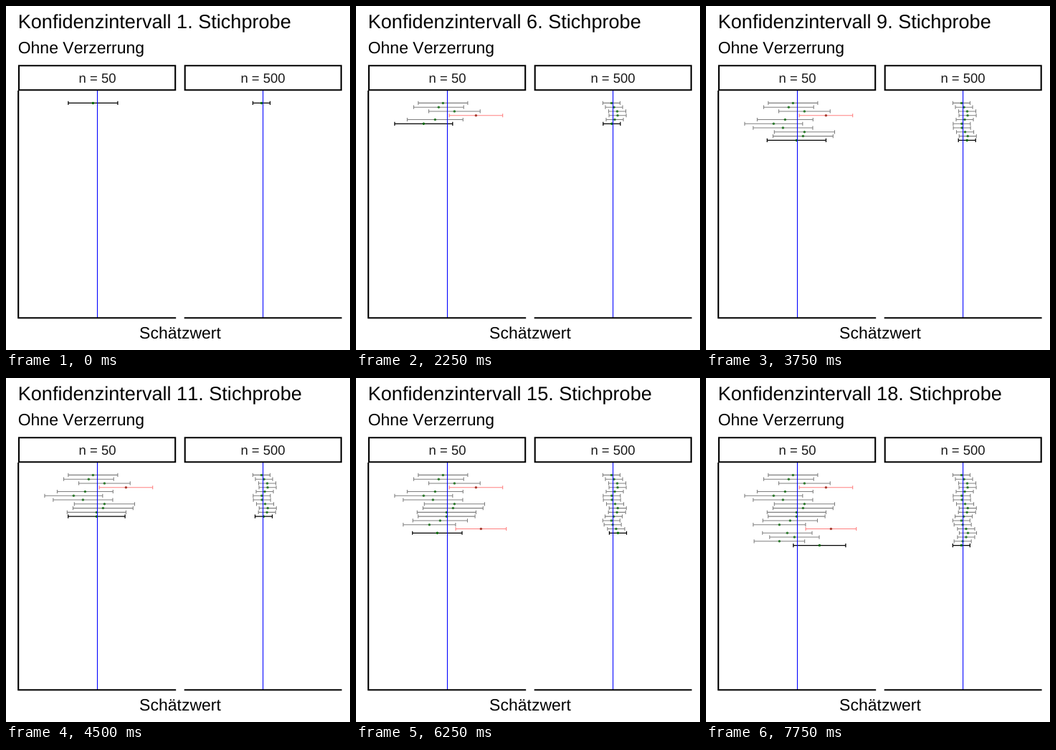
Recreate the animation shown at these times as an HTML page. Size 480 by 480 pixels, loop 8000 ms.

```html
<!DOCTYPE html>
<html lang="de">
<head>
<meta charset="utf-8">
<title>Konfidenzintervall</title>
<style>
  html, body { margin: 0; width: 100%; height: 100%; overflow: hidden; background: #fff; }
  svg { display: block; width: 100vw; height: 100vh; }
  text { font-family: "Liberation Sans", Arial, sans-serif; font-size: 23px; font-kerning: none; text-rendering: geometricPrecision; }
  .title { font-size: 27.1px; }
  .strip { font-size: 18.5px; fill: #1a1a1a; text-anchor: middle; }
  .frame { fill: none; stroke: #000; stroke-width: 2.1; }
  .truth { stroke: #00f; stroke-width: 1.07; }
  .bar { fill: none; stroke: #000; stroke-width: 1.07; opacity: 0.5; }
  .dot { fill: #006400; opacity: 0.75; }
  .missed .bar { stroke: #f00; }
  .missed .dot { fill: #8b1000; }
  .newest .bar { stroke-width: 1.25; opacity: 1; }
  .newest .dot { opacity: 1; }
</style>
</head>
<body>
<svg viewBox="0 0 480 480">
  <text id="title" class="title" x="16.7" y="31"></text>
  <text x="16.7" y="66">Ohne Verzerrung</text>
  <text x="243" y="464" text-anchor="middle">Schätzwert</text>
  <text class="strip" x="127.5" y="107">n = 50</text>
  <text class="strip" x="358.5" y="107">n = 500</text>
  <g id="bars"></g>
  <path class="truth" d="M127.5 118V435M358.6 118V435"/>
  <path class="frame" d="M18 83.2H236.2V117.2H18ZM249.7 83.2H467.7V117.2H249.7ZM17.2 118V435.2M16.2 435.2H237.2M248.7 435.2H468.6"/>
</svg>
<script>
const FRAME_MS = 250, FRAMES = 32, SAMPLES = 18;
const FIRST_Y = 135.4, ROW = 5.775, CAP = 2.6;

const wave = (i, peak, period) => Math.cos(2 * Math.PI * (i - peak) / period);

// Errors of the small samples; the large samples stay close to the truth.
const errors = [-6, -12, 10, 40, -17, -33, -20, 10, 8, -1, -1, -10, -25, 47, -14, -4, -25, 31];
const panels = [
  { truth: 127.4, error: i => errors[i], half: i => 38.3 - 3.8 * wave(i, 0, 14.5) },
  { truth: 358.6, error: i => 2.3 + 4.6 * wave(i, 2.6, 5.7), half: () => 12 }
];

function add(parent, tag, attributes) {
  const node = document.createElementNS("http://www.w3.org/2000/svg", tag);
  for (const key in attributes) node.setAttribute(key, attributes[key]);
  return parent.appendChild(node);
}

function drawInterval(row, i, { truth, error, half }) {
  const y = FIRST_Y + i * ROW, x = truth + error(i);
  const lo = x - half(i), hi = x + half(i);
  const group = add(row, "g", { class: lo > truth || hi < truth ? "missed" : "" });
  const cap = end => `M${end} ${y - CAP}v${2 * CAP}`;
  add(group, "path", { class: "bar", d: `${cap(lo)}M${lo} ${y}H${hi}${cap(hi)}` });
  add(group, "circle", { class: "dot", cx: x, cy: y, r: 1.75 });
}

const title = document.getElementById("title");
const layer = document.getElementById("bars");
const rows = Array.from({ length: SAMPLES }, (_, i) => {
  const row = add(layer, "g", {});
  panels.forEach(panel => drawInterval(row, i, panel));
  return row;
});

// Two steps per sample, but every fifth sample follows after one.
const startStep = n => 2 * (n - 1) - Math.floor((n + 1) / 5);

function render(now) {
  const step = Math.floor(now / FRAME_MS) % FRAMES;
  let sample = 1;
  while (startStep(sample + 1) <= step) sample++;
  // The next interval appears one step before the title counts up.
  const newest = startStep(sample) === step ? sample : sample + 1;
  title.textContent = `Konfidenzintervall ${sample}. Stichprobe`;
  rows.forEach((row, i) => {
    row.style.display = i < newest ? "" : "none";
    row.classList.toggle("newest", i === newest - 1);
  });
  requestAnimationFrame(render);
}
render(performance.now());
</script>
</body>
</html>
```
